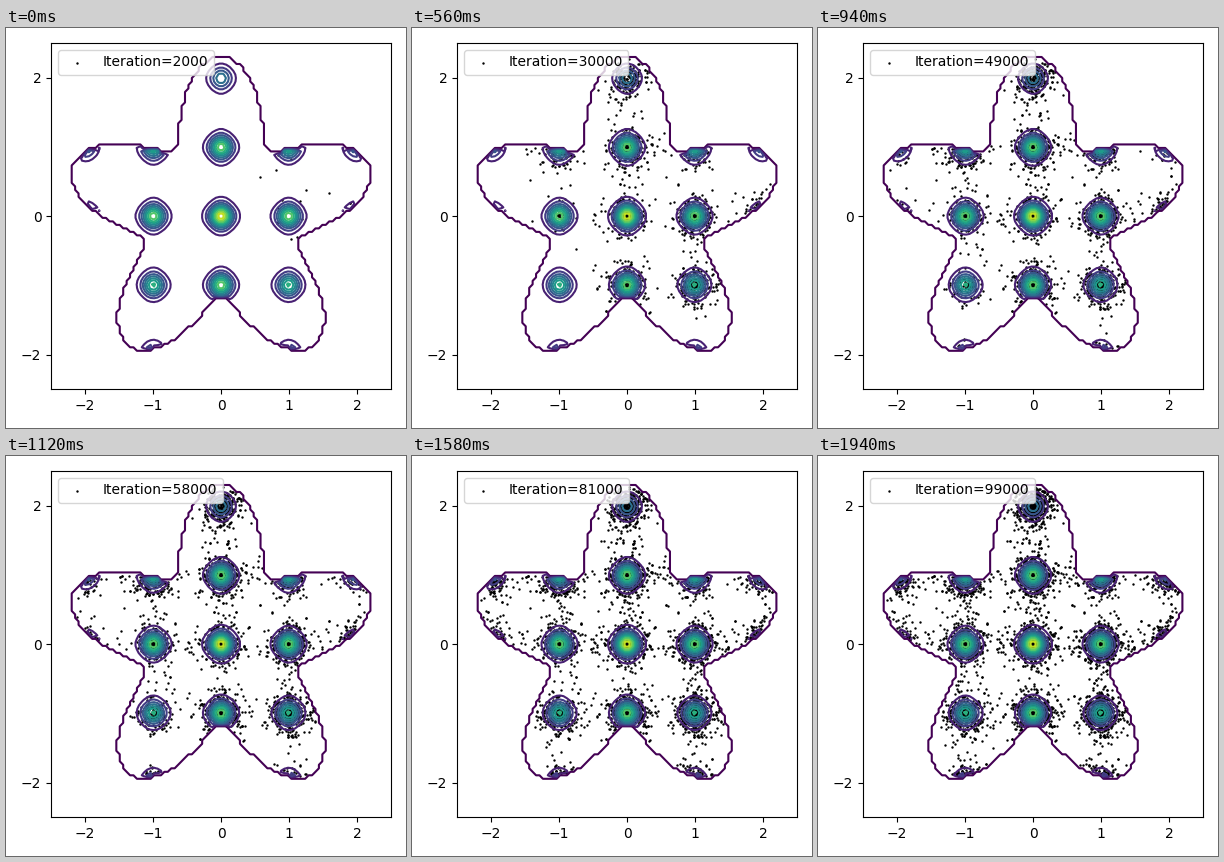
A matplotlib script for the animation above (1960 ms loop, 400 by 400 pixels).

```python
import numpy as np
import matplotlib.pyplot as plt
from matplotlib.animation import FuncAnimation

FRAMES, INTERVAL = 98, 20
FIRST, PER_STEP = 20, 60
rng = np.random.default_rng(11)


def energy(x, y, bowl=0.2):
    wells = np.cos(2 * np.pi * x) + np.cos(2 * np.pi * y)
    return bowl * (x**2 + y**2) - 2 * wells


def in_flower(x, y):
    return np.hypot(x, y) < 1.72 + 0.56 * np.sin(5 * np.arctan2(y, x))


def candidates(n=700_000):
    """Rejection sampling, mostly cold with some warm excursions."""
    x, y = rng.uniform(-2.3, 2.3, (2, n))
    warm = rng.random(n) < 0.07
    temp = np.where(warm, 2.0, 1.0)
    keep = rng.random(n) < np.exp(-(energy(x, y, 0.06) + 4) / temp)
    keep &= in_flower(x, y)
    return np.column_stack([x, y])[keep], warm[keep]


def first_visit(x, y):
    """Thousands of iterations until the walk reaches the mode at x, y."""
    t = np.where((x > 0) & (y >= 0), 0, 3)
    t = np.where(x < 0, 14 * (1 - x - y), t)
    return np.where(x**2 + y**2 > 4, 45, t)


def sample_walk():
    pool, warm = candidates()
    start = first_visit(*np.rint(pool).T)

    def pick(n, weight):
        return pool[rng.choice(len(pool), n, p=weight / weight.sum())]

    parts = [pick(FIRST, 1.0 * (warm & (start == 0)))]
    for k in range(3, FRAMES + 2):
        age = k - start
        # a new mode is visited often at first
        fresh = 1 + 2 * np.exp(-np.maximum(age, 0) / 10)
        parts.append(pick(PER_STEP, np.where(age < 0, 0, fresh)))
    return np.concatenate(parts)


walk = sample_walk()

fig, ax = plt.subplots(figsize=(4, 4), dpi=100)
dots = ax.scatter([], [], s=3, c="k", linewidths=0, label="Iteration=2000")

axis = np.linspace(-2.5, 2.5, 100)
X, Y = np.meshgrid(axis, axis)
Z = np.where(in_flower(X, Y), np.exp(-energy(X, Y)), 0)
ax.contour(X, Y, Z, levels=np.arange(0, 56, 5), cmap="viridis")

ax.set(xlim=(-2.5, 2.5), ylim=(-2.5, 2.5),
       xticks=range(-2, 3), yticks=(-2, 0, 2))
label = ax.legend(loc="upper left").get_texts()[0]
fig.tight_layout()


def update(i):
    dots.set_offsets(walk[:FIRST + PER_STEP * i])
    label.set_text(f"Iteration={1000 * (i + 2)}")
    return dots, label


anim = FuncAnimation(fig, update, frames=FRAMES, interval=INTERVAL,
                     repeat=True, repeat_delay=0, blit=False)
plt.show()
```
